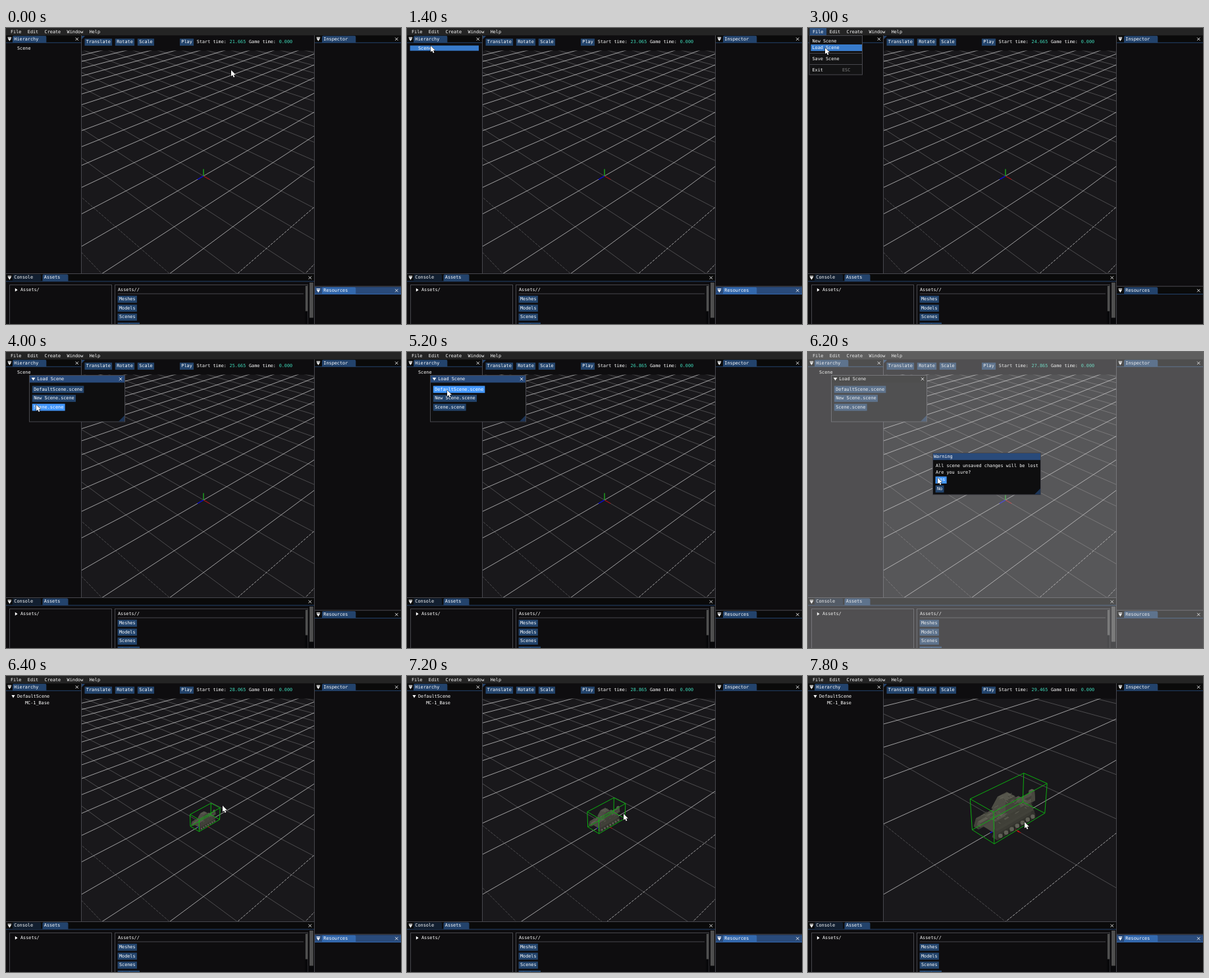
An HTML page with a canvas that plays this animation: 600 by 450 pixels, repeating every 8000 ms.

```html
<!DOCTYPE html>
<html lang="en">
<head>
<meta charset="utf-8">
<title>Scene editor</title>
<style>
  html, body { margin: 0; width: 100%; height: 100%; overflow: hidden; background: #0e0d0f; }
  canvas { display: block; }
</style>
</head>
<body>
<canvas id="stage" width="600" height="450"></canvas>
<script>
const ctx = document.getElementById('stage').getContext('2d');
const LOOP = 8000, STEP = 200;
const MENU_OPEN = 1800, LOADER_OPEN = 3400, MODAL_OPEN = 5600, LOADED = 6400;
const PAD = 2.35, GAP = 4.7, BUTTON_H = 10.7, ROW = 13.6;

const C = {
  bg: '#0e0d0f', bar: '#242424', title: '#0a0a0a', titleOn: '#294a7a',
  tab: '#23436c', tabOn: '#3368ad', tabOff: '#121f30', button: '#23446c',
  hover: '#4296fa', row: '#387bcb', border: '#46464c', view: '#19181b',
  text: '#fff', value: '#3fd8b8', grey: '#808080'
};

const mix = (a, b, u) => a + (b - a) * u;
function ease(t, from, to) {
  const u = Math.min(1, Math.max(0, (t - from) / (to - from)));
  return u * u * (3 - 2 * u);
}
function seeded(seed) {
  return () => (seed = seed * 16807 % 2147483647) / 2147483647;
}

const moves = [
  { from: 200, to: 1200, at: [36, 27] },
  { from: 1400, to: 1800, at: [15, 6] },
  { from: 2400, to: 3000, at: [26, 30] },
  { from: 3400, to: 4000, at: [46, 80] },
  { from: 4200, to: 5000, at: [61, 58] },
  { from: 5400, to: 6200, at: [197, 191] },
  { from: 6200, to: 6400, at: [329, 197] },
  { from: 6800, to: 7600, at: [329, 222] }
];
const cursorAt = t => moves.reduce(
  (p, m) => p.map((v, i) => mix(v, m.at[i], ease(t, m.from, m.to))), [342, 64]);

let mouse;
const over = (x, y, w, h) =>
  mouse[0] >= x && mouse[0] < x + w && mouse[1] >= y && mouse[1] < y + h;

function rect(x, y, w, h, color) {
  ctx.fillStyle = color;
  ctx.fillRect(x, y, w, h);
}
function frame(x, y, w, h) {
  ctx.strokeStyle = C.border;
  ctx.lineWidth = 1;
  ctx.strokeRect(x, y, w, h);
}
const widthOf = s => ctx.measureText(s).width;
function text(s, x, y, color = C.text) {
  ctx.fillStyle = color;
  ctx.fillText(s, x, y);
  return x + widthOf(s) + GAP;
}
function poly(points, fill) {
  ctx.beginPath();
  points.forEach(p => ctx.lineTo(...p));
  ctx.closePath();
  ctx.fillStyle = fill;
  ctx.fill();
}
function line(a, b, color, width = 1) {
  ctx.beginPath();
  ctx.moveTo(...a);
  ctx.lineTo(...b);
  ctx.strokeStyle = color;
  ctx.lineWidth = width;
  ctx.stroke();
}
const arrowDown = (x, y, r = 2.5) => poly([[x - r, y - 2], [x + r, y - 2], [x, y + 2.4]], C.text);
const grip = (x, y) => poly([[x, y - 9], [x, y], [x - 9, y]], '#1d3557');
function cross(x, y) {
  for (const d of [-2.2, 2.2]) line([x - 2.2, y - d], [x + 2.2, y + d], '#e8e8e8', 0.9);
}
function button(label, x, y, live = true) {
  const w = widthOf(label) + 2 * PAD;
  rect(x, y, w, BUTTON_H, live && over(x, y, w, BUTTON_H) ? C.hover : C.button);
  text(label, x + PAD, y + 5.4);
  return x + w + GAP;
}
function tab(label, x, y, color) {
  const w = widthOf(label) + 14.4;
  ctx.beginPath();
  ctx.roundRect(x, y, w, 10.5, [2, 2, 0, 0]);
  ctx.fillStyle = color;
  ctx.fill();
  text(label, x + PAD, y + 5.2);
  return x + w + PAD;
}
function dockBar(x, y, w, active) {
  rect(x, y, w, 11.5, active ? C.titleOn : C.title);
  rect(x, y + 10.6, w, 1, active ? C.tabOn : C.tab);
  rect(x + 2.6, y + 2.6, 5.6, 1, C.text);
  arrowDown(x + 5.4, y + 6.3, 2.8);
  cross(x + w - 6.7, y + 5.6);
}

// Isometric camera aimed at the origin, 45 degree field of view.
const FOCAL = 225 / Math.tan(Math.PI / 8), GRID = 0.0966;
let distance = 1;
function project(x, y, z) {
  const k = FOCAL / (distance - (x + y + z) / Math.sqrt(3));
  return [300 + k * (x - z) / Math.SQRT2, 225 + k * (x + z - 2 * y) / Math.sqrt(6)];
}

function drawGrid() {
  for (const strong of [false, true]) {
    for (let n = -18; n <= 12; n++) {
      const c = n * GRID;
      const near = Math.sqrt(3) * 0.9 * distance - c;
      const [a, b] = [near, -5].map(v => strong ? project(c, 0, v) : project(v, 0, c));
      const steep = Math.abs((b[1] - a[1]) / (b[0] - a[0])) > 0.78;
      ctx.setLineDash(steep ? [4, 1.5] : []);
      line(a, b, `rgba(255,255,255,${strong ? 0.62 : 0.23})`, 0.95);
    }
  }
  ctx.setLineDash([]);
  const size = 0.0235, o = project(0, 0, 0);
  line(o, project(size, 0, 0), '#a00c10', 1.2);
  line(o, project(0, 0, size), '#0808b8', 1.5);
  line(o, project(0, size, 0), '#20b020', 1.3);
}

// Box with its top narrowed by `inset`; only the faces turned to the camera.
function block([x0, x1], [y0, y1], [z0, z1], tone, inset = 0) {
  const olive = f => `rgb(${tone * f},${tone * f},${tone * f * 0.88})`;
  const ring = (y, d) => [[x0 + d, z0 + d], [x1 - d, z0 + d], [x1 - d, z1 - d], [x0 + d, z1 - d]]
    .map(([x, z]) => project(x, y, z));
  const low = ring(y0, 0), top = ring(y1, inset);
  for (let i = 0; i < 4; i++) {
    const j = (i + 1) % 4;
    poly([low[i], low[j], top[j], top[i]], olive(i === 1 ? 0.78 : 0.9));
  }
  poly(top, olive(1));
}

function drawTank() {
  block([-0.003, 0.003], [0.012, 0.026], [-0.046, -0.039], 92, 0.001);
  block([-0.003, 0.002], [0.017, 0.021], [-0.04, -0.012], 80);
  block([-0.018, -0.010], [0.003, 0.014], [-0.034, 0.031], 74, 0.002);
  block([-0.013, 0.012], [0.007, 0.019], [-0.034, 0.027], 82, 0.003);
  block([0.009, 0.017], [0.002, 0.012], [-0.032, 0.029], 66, 0.002);
  for (let z = 0.024; z > -0.032; z -= 0.0085) {
    const [x, y] = project(0.0165, 0.005, z);
    ctx.beginPath();
    ctx.arc(x, y, 1.3 / distance, 0, 7);
    ctx.fillStyle = '#5f5f55';
    ctx.fill();
    line(project(0.017, 0.002, z - 0.004), project(0.017, 0.007, z - 0.004), '#20201d', 0.6 / distance);
  }
  block([-0.014, 0.008], [0.018, 0.033], [-0.016, 0.008], 86, 0.005);
  block([-0.010, -0.004], [0.010, 0.015], [0.02, 0.033], 92, 0.001);

  const random = seeded(7);
  for (let i = 0; i < 70; i++) {
    const x = mix(-0.013, 0.013, random()), z = mix(-0.03, 0.026, random());
    const y = Math.hypot(x + 0.003, z + 0.004) < 0.01 ? 0.031 : 0.018;
    const end = random() < 0.5 ? project(x, y, z - 0.006) : project(x + 0.003, y, z);
    line(project(x, y, z), end, i % 2 ? '#68685d' : '#3c3c35', 0.3 / distance);
  }
}

function drawBounds() {
  const x = [-0.018, 0.017], y = [0, 0.0394], z = [-0.048, 0.0335];
  const corner = i => project(x[i & 1], y[i >> 1 & 1], z[i >> 2]);
  for (let i = 0; i < 8; i++)
    for (const bit of [1, 2, 4])
      if (!(i & bit)) line(corner(i), corner(i | bit), '#0cae10', 1);
}

function drawViewport(t, loaded, live) {
  ctx.save();
  ctx.beginPath();
  ctx.rect(115, 34.5, 353, 338.5);
  ctx.clip();
  rect(115, 34, 353, 339, C.view);
  drawGrid();
  if (loaded) {
    drawTank();
    drawBounds();
    if (distance < 0.6) line(project(0.0185, 0, 0), project(0.021, 0, 0), '#d01010', 1.8);
  }
  ctx.restore();
  poly([[115, 12], [120, 12], [115, 17]], C.tab);
  ['Translate', 'Rotate', 'Scale'].reduce((x, label) => button(label, x, 16.2, live), 119.5);
  let x = button('Play', 264, 16.2, live);
  x = text('Start time:', x, 21.6);
  x = text((21.665 + t / 1000).toFixed(3), x, 21.6, C.value);
  x = text('Game time:', x, 21.6);
  text('0.000', x, 21.6, C.value);
}

function drawHierarchy(loaded, live) {
  dockBar(0, 11.2, 114.5, false);
  tab('Hierarchy', 10, 11.7, C.tab);
  if (loaded) {
    arrowDown(11, 31);
    text('DefaultScene', 17, 31);
    text('MC-1_Base', 29, 41);
    return;
  }
  if (live && over(4, 26, 105, 9)) rect(4.6, 26.6, 104.4, 8, C.row);
  text('Scene', 17, 31);
}

function drawAssets() {
  dockBar(0, 374, 468.5, false);
  tab('Assets', tab('Console', 10, 374.5, C.tabOff), 374.5, C.tab);
  frame(5.5, 390.5, 155, 70);
  frame(165.5, 390.5, 293, 70);
  poly([[13.8, 395.6], [17.6, 398.2], [13.8, 400.8]], C.text);
  text('Assets/', 22, 398.4);
  text('Assets//', 170, 398.4);
  rect(170, 403.5, 282, 1, C.border);
  ['Meshes', 'Models', 'Scenes', 'Shaders'].forEach((label, i) => button(label, 169.6, 407 + i * ROW));
  rect(454, 391, 4.5, 59, '#08080a');
  rect(454.8, 392, 3.4, 38.5, '#4f4f4f');
  rect(460, 386, 8, 64, '#08080a');
  rect(461, 387, 5.8, 53.5, '#4f4f4f');
}

function drawRight(focused) {
  dockBar(469, 11.2, 131, false);
  tab('Inspector', 480, 11.7, C.tab);
  dockBar(469, 393.5, 131, focused);
  tab('Resources', 480, 394, focused ? C.tabOn : C.tab);
  rect(469, 392.2, 131, 1, C.border);
}

function drawMenuBar(open, live) {
  rect(0, 0, 600, 11.2, C.bar);
  if (open) rect(2.5, 0, 25.5, 11.2, '#2b4e7c');
  else if (live && over(2, 0, 26, 11)) rect(2.5, 0, 25.5, 11.2, C.row);
  ['File', 'Edit', 'Create', 'Window', 'Help'].reduce((x, label) => text(label, x, 6) + GAP, 7);
}

function drawFileMenu() {
  rect(2, 11.5, 80.5, 59.5, '#131314');
  frame(2, 11.5, 80.5, 59.5);
  for (const [label, y] of [['New Scene', 20], ['Load Scene', 30], ['Save Scene', 47], ['Exit', 64]]) {
    if (over(2, y - 5, 80, 10)) rect(4.3, y - 5, 77.7, 10, C.row);
    text(label, 6.5, y);
  }
  text('ESC', 52, 64, C.grey);
  for (const y of [38, 55]) rect(2.5, y, 80, 1, C.border);
}

function drawLoader(focused) {
  rect(35.5, 35.5, 145, 70.5, '#0e0e0f');
  rect(35.5, 35.5, 145, 11, focused ? C.titleOn : C.title);
  frame(35.5, 35.5, 145, 70.5);
  grip(180, 105.5);
  arrowDown(41.5, 41, 2.8);
  text('Load Scene', 47.2, 41.2);
  cross(174, 41);
  ['DefaultScene.scene', 'New Scene.scene', 'Scene.scene']
    .forEach((label, i) => button(label, 39.8, 51.5 + i * ROW, focused));
}

function drawWarning() {
  rect(0, 0, 600, 450, 'rgba(204,204,204,.35)');
  rect(189.5, 153.5, 164, 63.5, '#0e0e0f');
  rect(189.5, 153.5, 164, 10.7, C.titleOn);
  frame(189.5, 153.5, 164, 63.5);
  grip(353, 216.5);
  text('Warning', 191, 159);
  text('All scene unsaved changes will be lost', 194, 173);
  text('Are you sure?', 194, 183);
  ['Yes', 'No'].forEach((label, i) => button(label, 193.6, 189.3 + i * ROW));
}

function drawCursor([x, y]) {
  ctx.beginPath();
  [[0, 0], [0, 9.6], [2.2, 7.6], [3.7, 11], [5.4, 10.2], [3.9, 7], [6.9, 6.9]]
    .forEach(([dx, dy]) => ctx.lineTo(x + dx, y + dy));
  ctx.closePath();
  ctx.strokeStyle = '#000';
  ctx.lineWidth = 1;
  ctx.stroke();
  ctx.fillStyle = '#fff';
  ctx.fill();
}

function draw(t) {
  const menu = t >= MENU_OPEN && t < LOADER_OPEN;
  const loader = t >= LOADER_OPEN && t < LOADED;
  const modal = t >= MODAL_OPEN && t < LOADED;
  const loaded = t >= LOADED;
  const live = !menu && !loader;
  mouse = cursorAt(t);
  distance = mix(1, 0.4, ease(t, 6800, 7800));

  ctx.font = '6.82px "DejaVu Sans Mono", monospace';
  ctx.textBaseline = 'middle';
  ctx.textRendering = 'geometricPrecision';
  rect(0, 0, 600, 450, C.bg);
  drawHierarchy(loaded, live);
  drawViewport(t, loaded, live);
  drawAssets();
  drawRight(live);
  rect(114, 11, 1, 362, C.border);
  rect(468, 11, 1, 439, C.border);
  rect(0, 373, 468, 1, C.border);
  drawMenuBar(menu, live);
  if (menu) drawFileMenu();
  if (loader) drawLoader(!modal);
  if (modal) drawWarning();
  drawCursor(mouse);
}

const start = performance.now();
function tick() {
  const t = (performance.now() - start) % LOOP;
  draw(Math.floor(t / STEP) * STEP);
  requestAnimationFrame(tick);
}
tick();
</script>
</body>
</html>
```
